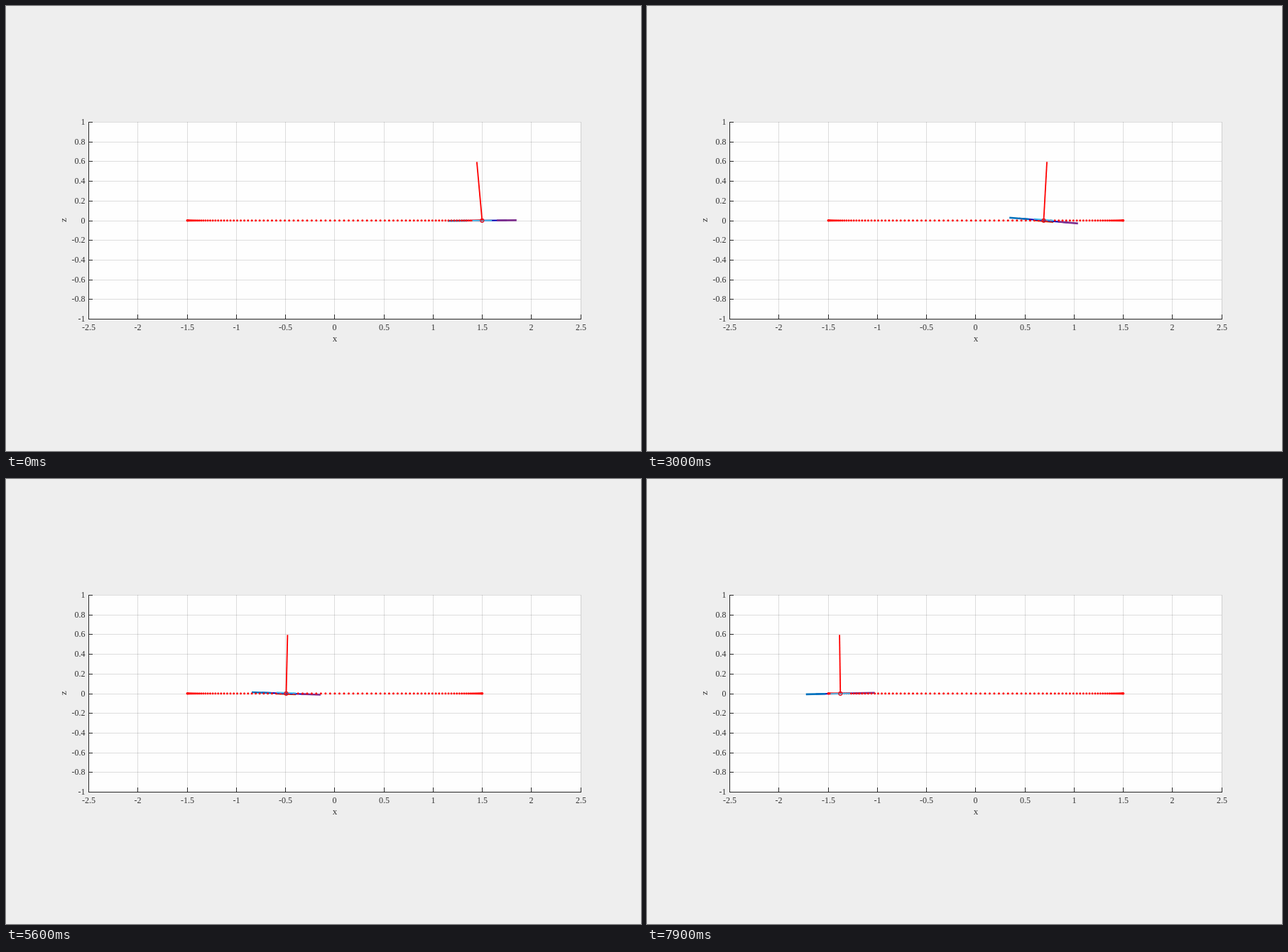
Animation, 894 px wide and 626 px high, one loop 8 s. Source, as an HTML page with a canvas:

```html
<!DOCTYPE html>
<html>
<head>
<meta charset="utf-8">
<style>
html, body { margin: 0; width: 100%; height: 100%; overflow: hidden; background: #eee; }
canvas { display: block; }
</style>
</head>
<body>
<canvas id="stage" width="894" height="626"></canvas>
<script>
const ctx = document.getElementById('stage').getContext('2d');
const UNIT = 138.5, ZERO_X = 462.9, ZERO_Y = 301.8;
const STEP = 100, LOOP = 8000;
const ARM = 0.25 * UNIT, ROTOR = 0.1 * UNIT, ROD = 82.5;

const pathX = s => ZERO_X + 1.5 * UNIT * Math.cos(s * Math.PI / 100);

// The craft runs ahead of the path after a damped starting swing.
function pose(s) {
  const swing = (28 + 12.5 * s + 5.6 * s * s) * Math.exp(-s / 2.7);
  const x = pathX(s) - 28 + swing + 1.5 * Math.cos(s / 7.3 - 4.5);
  const tilt = .036 + .058 * Math.cos((s - 34) / 14)
    + (.27 * s - .048 * s * s) * Math.exp(-s / 3.5);
  const lean = .65 * tilt - .085 * Math.exp(-s / 1.5);
  const gap = 1.3 * Math.sin(s * Math.PI / 75);
  return { x, tilt, lean, gap };
}

function line(x1, y1, x2, y2, color, width = 1) {
  ctx.strokeStyle = color;
  ctx.lineWidth = width;
  ctx.beginPath();
  ctx.moveTo(x1, y1);
  ctx.lineTo(x2, y2);
  ctx.stroke();
}

function circle(x, y, r) {
  ctx.beginPath();
  ctx.arc(x, y, r, 0, 7);
}

function label(text, x, y, align, size = 12) {
  ctx.font = size + 'px "Liberation Serif", serif';
  ctx.textAlign = align;
  ctx.fillStyle = '#333';
  ctx.fillText(text, x, y);
}

function drawAxes() {
  const grid = 'rgba(0,0,0,.13)', ink = '#262626';
  ctx.fillStyle = '#eee';
  ctx.fillRect(0, 0, 894, 626);
  ctx.fillStyle = '#fefefe';
  ctx.fillRect(116, 163, 693, 278);
  const gridX = i => Math.floor(116.5 + 69.25 * i) + .5;
  const gridY = i => Math.floor(163.5 + 27.7 * i) + .5;
  for (let i = 0; i <= 10; i++) {
    line(gridX(i), 163, gridX(i), 440, grid);
    line(116, gridY(i), 809, gridY(i), grid);
  }
  line(116.5, 163, 116.5, 441, ink);
  line(116, 440.5, 809, 440.5, ink);
  for (let i = 0; i <= 10; i++) {
    line(gridX(i), 434, gridX(i), 441, ink);
    line(116, gridY(i), 122, gridY(i), ink);
    label(String(i / 2 - 2.5), gridX(i), 456, 'center');
    label(String((5 - i) / 5), 111.5, gridY(i) + 3, 'right');
  }
  label('x', 463, 471.5, 'center', 13);
  ctx.save();
  ctx.translate(84.5, 301);
  ctx.rotate(-Math.PI / 2);
  label('z', 0, 0, 'center', 13);
  ctx.restore();
}

function drawPath() {
  ctx.fillStyle = '#f00';
  for (let i = 0; i <= 100; i++) {
    circle(pathX(i), ZERO_Y, 1.5);
    ctx.fill();
  }
}

function drawCraft({ x, tilt, lean, gap }) {
  const bar = (dx, dy, half, color, width) => {
    ctx.save();
    ctx.translate(x, ZERO_Y);
    ctx.rotate(tilt);
    line(dx - half, dy, dx + half, dy, color, width);
    ctx.restore();
  };
  bar(0, gap, ROTOR, '#d95319', 2);
  bar(0, 0, ARM, '#0000b8', 2);
  bar(-ARM, 0, ROTOR, '#0072bd', 2.6);
  bar(ARM, 0, ROTOR, '#7e2f8e', 2.6);
  drawPath();
  bar(0, -gap, ROTOR, '#4dbeee', 2);
  line(x, ZERO_Y, x + ROD * Math.tan(lean), ZERO_Y - ROD, '#f00', 1.8);
  ctx.strokeStyle = '#e01020';
  ctx.lineWidth = 1.2;
  circle(x, ZERO_Y, 2.5);
  ctx.stroke();
}

function frame() {
  drawAxes();
  drawCraft(pose(Math.floor(performance.now() % LOOP / STEP)));
  requestAnimationFrame(frame);
}
frame();
</script>
</body>
</html>
```
